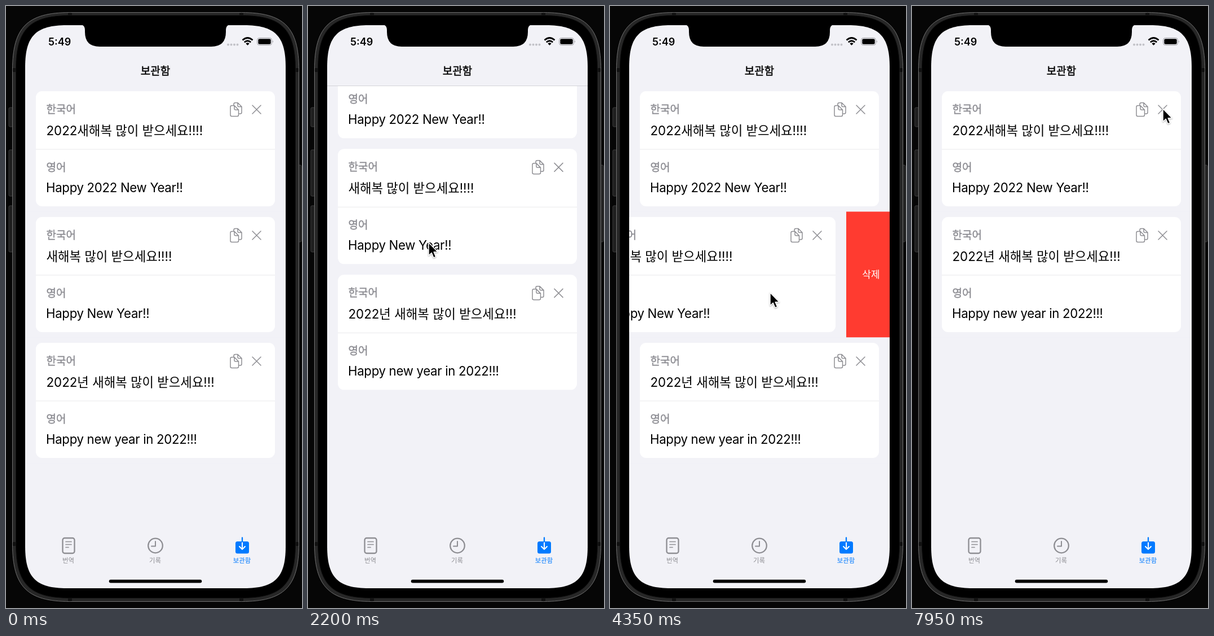
These frames come from a looping animation (525 by 1067 pixels, 8 s). An HTML page:

```html
<!DOCTYPE html>
<html lang="ko">
<head>
<meta charset="utf-8">
<style>
  html, body { margin: 0; width: 100%; height: 100%; overflow: hidden; background: #060606; }
  svg { display: block; width: 525px; height: 1067px; font-family: Inter, "Noto Sans CJK KR", "Noto Sans CJK", sans-serif; }
  .semi { font-size: 19px; font-weight: 500; stroke: currentColor; stroke-width: .4px; fill: currentColor; }
  .label { color: #8c8c92; }
  .ko { font-size: 22.3px; }
  .en { font-size: 22.2px; letter-spacing: -.3px; }
  .tab { font-size: 11.4px; text-anchor: middle; }
  .line { fill: none; stroke: #8e8e93; stroke-width: 1.5; stroke-linejoin: round; stroke-linecap: round; }
  .bg { fill: #f2f2f7; }
</style>
</head>
<body>
<svg viewBox="0 0 525 1067">
  <defs>
    <clipPath id="screen"><path id="glass"/></clipPath>
    <clipPath id="list"><rect x="34" y="141" width="462" height="792"/></clipPath>
    <g id="tools" class="line">
      <path d="M404 176v-2q0-2.500 2.500-2.500H411l7 7v10q0 2.500-2.500 2.500H413M411 171.500v5q0 2 2 2h5"/>
      <path d="M400.500 176.500H405l7.500 7.500v9q0 2.500-2.500 2.500h-9.500q-2.500 0-2.500-2.500v-14q0-2.500 2.500-2.500ZM405 176.500v5.500q0 2 2 2h5.500"/>
      <path d="M437 176l15 15M452 176l-15 15"/>
    </g>
  </defs>

  <!-- phone body -->
  <g fill="#1f1f1f" stroke="#3c3c3c">
    <rect x="5" y="180" width="8" height="34" rx="2"/>
    <rect x="5" y="255" width="8" height="82" rx="2"/>
    <rect x="5" y="354" width="8" height="82" rx="2"/>
    <rect x="517" y="282" width="7" height="136" rx="2"/>
  </g>
  <path id="rim" fill="#272727" stroke="#707070"/>
  <path d="M12 113.500h6m495 0h6M12 953.500h6m495 0h6M113.500 12v5m0 1033v5M417.500 12v5m0 1033v5" stroke="#111" stroke-width="7"/>
  <path id="bezel" fill="#000" stroke="#151515"/>

  <g clip-path="url(#screen)">
    <rect class="bg" x="34" y="34" width="462" height="998"/>
    <g clip-path="url(#list)"><g id="rows"></g></g>
    <path id="rule" d="M34 141.500H496" stroke="#d3d3d8"/>

    <!-- status and title -->
    <path d="M131 33q9 0 9 10v3q0 26 26 26H364q26 0 26-26v-3q0-10 9-10z"/>
    <text x="75" y="70" font-size="18" font-weight="600">5:49</text>
    <path d="M394 68.500h17" stroke="#c2c2c8" stroke-width="4" stroke-linecap="round" stroke-dasharray="0 5.500"/>
    <g fill="none" stroke="#000" stroke-width="2.800">
      <path d="M419.500 60.500q9-8 18 0M422.800 64.300q5.700-5 11.400 0"/>
      <path d="M425.300 66.500q3.200-2.600 6.400 0L428.500 69.800z" fill="#000" stroke="none"/>
    </g>
    <rect x="445.500" y="56.500" width="26" height="13" rx="4" fill="none" stroke="#a0a0a5"/>
    <rect x="447.300" y="58.300" width="22.400" height="9.400" rx="2.300"/>
    <path d="M473 61q2 2 0 4z" fill="#a0a0a5"/>
    <text class="semi" x="265" y="122" text-anchor="middle">보관함</text>

    <!-- tab bar -->
    <g class="line" style="stroke-width:2.300">
      <rect x="100.500" y="943" width="21" height="27" rx="3.500"/>
      <path d="M106 949.500h10m-10 5h10m-10 5h5" stroke-width="1.700"/>
      <circle cx="265" cy="956.500" r="12.800"/>
      <path d="M265 949v8.500h-7" stroke-width="2"/>
    </g>
    <rect x="407" y="949" width="24" height="21.500" rx="3.500" fill="#007aff"/>
    <path d="M419 949v13.500m-5-4.500l5 5 5-5" fill="none" stroke="#fff" stroke-width="2" stroke-linecap="round" stroke-linejoin="round"/>
    <path d="M419 942.500v7" stroke="#007aff" stroke-width="2.300" stroke-linecap="round"/>
    <g class="tab" fill="#8e8e93">
      <text x="110.500" y="987">번역</text>
      <text x="264.500" y="987">기록</text>
      <text x="418.500" y="987" fill="#007aff" font-weight="500">보관함</text>
    </g>
    <rect x="182.700" y="1016.700" width="164.600" height="5.800" rx="2.900"/>
  </g>

  <path id="cursor" d="M1 1V24L6.200 19.200 9.800 27.800 13.800 26.100 10.200 17.700H17.300Z" stroke="#fff" stroke-width="1.500" stroke-linejoin="round" style="filter:drop-shadow(0 1px 1px #0005)"/>
</svg>

<script>
const $ = id => document.getElementById(id);
const move = (el, x, y) => el.setAttribute('transform', `translate(${x.toFixed(2)} ${y.toFixed(2)})`);
const show = (el, on) => { el.style.display = on ? '' : 'none'; };

// Rounded box, inset on the stage, whose corners blend gradually into the sides.
function squircle(x, y, w, h, e) {
  const c = 0.743 * e, f = e - c;
  return `M${x + e} ${y}h${w - 2 * e}c${c} 0 ${e} ${f} ${e} ${e}v${h - 2 * e}`
    + `c0 ${c} ${-f} ${e} ${-e} ${e}h${2 * e - w}c${-c} 0 ${-e} ${-f} ${-e} ${-e}v${2 * e - h}`
    + `c0 ${-c} ${f} ${-e} ${e} ${-e}z`;
}
$('rim').setAttribute('d', squircle(11.5, 11.5, 508, 1044, 102));
$('bezel').setAttribute('d', squircle(17.5, 16.5, 496, 1033, 96));
$('glass').setAttribute('d', squircle(34, 34, 462, 998, 74));

const ROW = 223, RIGHT = 496;
const phrases = [
  ['2022새해복 많이 받으세요!!!!', 'Happy 2022 New Year!!'],
  ['새해복 많이 받으세요!!!!', 'Happy New Year!!'],
  ['2022년 새해복 많이 받으세요!!!', 'Happy new year in 2022!!!']
];

$('rows').innerHTML = phrases.map(([ko, en], i) => `
  <g id="row${i}">
    <rect class="bg" x="34" y="141.500" width="462" height="${ROW}"/>
    ${i === 1 ? `<rect id="red" y="141.500" height="${ROW}" fill="#ff3b30"/>
    <text id="remove" y="259" fill="#fff" font-size="17" text-anchor="middle">삭제</text>` : ''}
    <g id="card${i}">
      <rect x="53" y="151" width="424" height="204" rx="11" fill="#fff"/>
      <path d="M53 254H477" stroke="#e9e9ec"/>
      <text class="semi label" x="71.500" y="190">한국어</text>
      <use href="#tools"/>
      <text class="ko" x="71.500" y="229">${ko}</text>
      <text class="semi label" x="71.500" y="293">영어</text>
      <text class="en" x="71" y="330">${en}</text>
    </g>
  </g>`).join('');

function ease(t, from, to) {
  const u = Math.min(1, Math.max(0, (t - from) / (to - from)));
  return u * u * (3 - 2 * u);
}

// Cursor moves: start, end, and the point reached.
const moves = [
  [250, 750, 184, 254],
  [1300, 1480, 184, 766],   // pull down
  [1650, 2100, 212, 655],
  [2100, 2306, 214, 160],   // push up
  [2660, 3050, 285, 255],
  [3100, 3600, 360, 507],
  [3650, 4350, 283, 507],   // swipe the row
  [4750, 5250, 447, 481],   // tap delete
  [6400, 6900, 441, 245],
  [7100, 7400, 444, 181]
];
const pointer = t => moves.reduce(([x, y], [from, to, x1, y1]) => {
  const k = ease(t, from, to);
  return [x + (x1 - x) * k, y + (y1 - y) * k];
}, [-20, 603]);

// Overscroll resists the drag, then springs back once released.
const rubber = d => d / (1 + Math.abs(d) * 0.58 / 998) * 0.58;
function overscroll(t, start, release) {
  if (t < start) return 0;
  const drag = pointer(Math.min(t, release))[1] - pointer(start)[1];
  const s = Math.max(0, t - release) * 0.0153;
  return rubber(drag) * (1 + s) * Math.exp(-s);
}

function draw(t) {
  const y = overscroll(t, 1300, 1492) + overscroll(t, 2100, 2660);
  const gone = ease(t, 5600, 5950);
  const x = -77 * ease(t, 3650, 4350) - 11 * ease(t, 4400, 4600) - 374 * gone;
  move($('rows'), 0, y);
  move($('row1'), 0, ROW);
  move($('row2'), 0, ROW * (2 - gone));
  move($('card1'), x, 0);
  $('red').setAttribute('x', RIGHT + x);
  $('red').setAttribute('width', -x);
  $('remove').setAttribute('x', RIGHT + x + 44);
  show($('row1'), gone < 1);
  show($('rule'), y < -0.2);
  show($('cursor'), t >= 250);
  move($('cursor'), ...pointer(t));
}

const start = performance.now();
function tick() {
  const t = (performance.now() - start) % 8000;
  draw(Math.floor(t / 50) * 50);
  requestAnimationFrame(tick);
}
tick();
</script>
</body>
</html>
```
